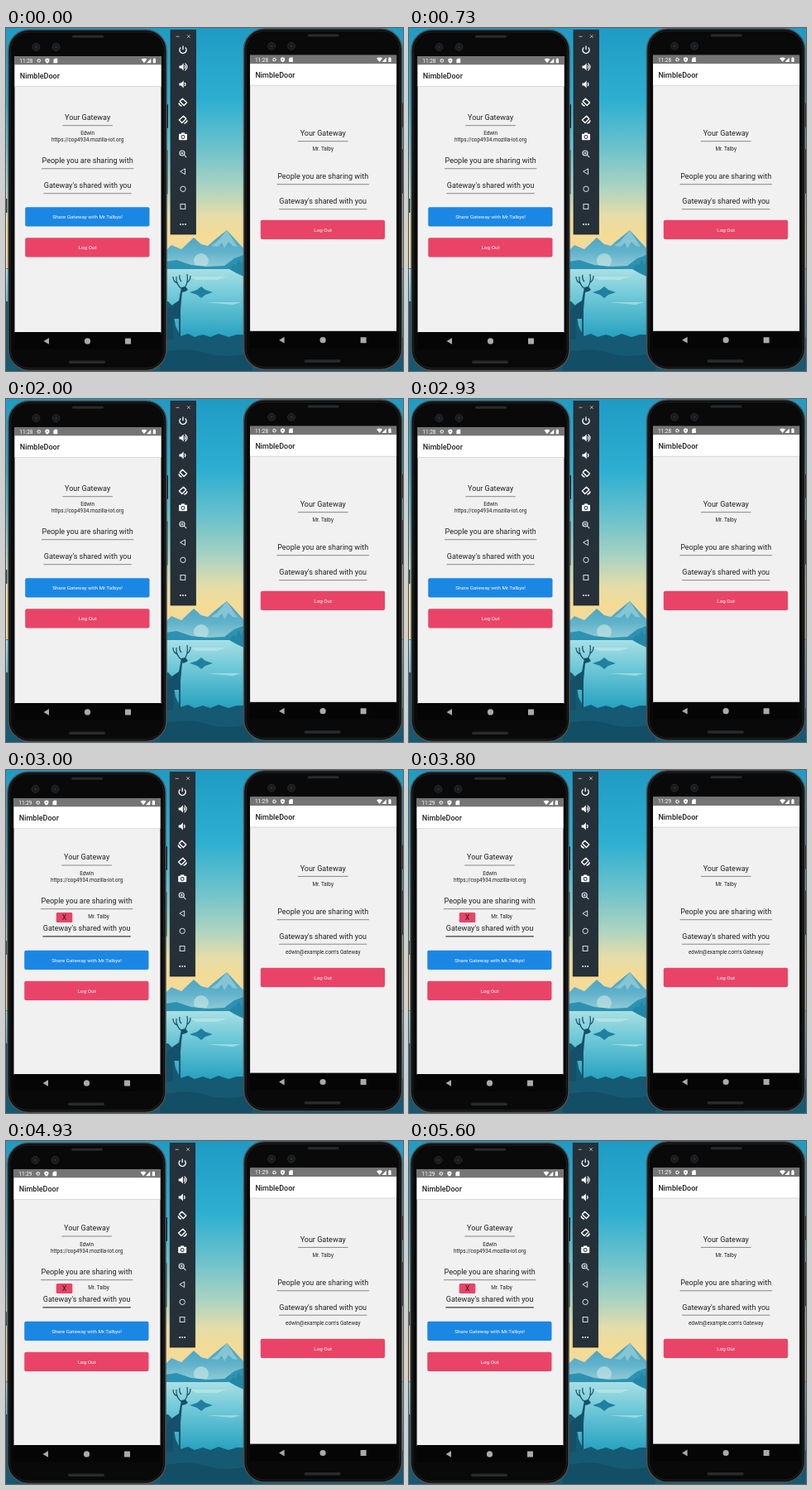
Recreate the animation shown at these times as an HTML page. Size 480 by 414 pixels, loop 5990 ms.

```html
<!DOCTYPE html>
<html lang="en">
<head>
<meta charset="utf-8">
<title>Gateway sharing</title>
<style>
html, body { margin: 0; width: 100%; height: 100%; overflow: hidden; background: #1b95b8; }
svg { display: block; width: 480px; height: 414px; font-family: Roboto, Arial, sans-serif; }
</style>
</head>
<body>
<svg id="stage" viewBox="0 0 480 414">
  <defs>
    <linearGradient id="sky" x2="0" y2="1">
      <stop offset="0" stop-color="#1f9bc4"/>
      <stop offset=".3" stop-color="#2dafd1"/>
      <stop offset=".5" stop-color="#6cc2cc"/>
      <stop offset=".66" stop-color="#a9d3c2"/>
      <stop offset=".78" stop-color="#e5dda8"/>
      <stop offset=".86" stop-color="#f4db95"/>
      <stop offset="1" stop-color="#f1d9a5"/>
    </linearGradient>
    <linearGradient id="peaks" x2="0" y2="1">
      <stop offset="0" stop-color="#429fc0"/>
      <stop offset=".5" stop-color="#62b3cb"/>
      <stop offset="1" stop-color="#a5d5da"/>
    </linearGradient>
    <linearGradient id="lake" x2="0" y2="1">
      <stop offset="0" stop-color="#a9dfe4"/>
      <stop offset=".35" stop-color="#74cbd9"/>
      <stop offset="1" stop-color="#24a0bf"/>
    </linearGradient>
  </defs>
  <g id="wallpaper">
    <rect width="480" height="290" fill="url(#sky)"/>
    <path d="M186 276l14-14 12 5 15-14 9 8 8 2 8-7 15-12 11 12 12 13 8 2v26H186z" fill="url(#peaks)"/>
    <path d="M267 244l-12 14-7 5 8 1 5-5 3 7 5-8 5 5 6 1z" fill="#86c5d4"/>
    <circle cx="236" cy="281" r="9" fill="#c4e5e3" opacity=".65"/>
    <path d="M186 283l20-3 18 6 20 2 20-1 12-9 22-8v26H186z" fill="#2d92b2"/>
    <rect y="291" width="480" height="84" fill="url(#lake)"/>
    <path d="M222 300h45l-12 4h-25zM242 331h42l-10 3z" fill="#c3e9eb" opacity=".6"/>
    <path d="M222 319l9-3 5-4 5 4 9 3-9 3-5 4-5-4z" fill="#207f9f"/>
    <path d="M270 291l5-6 3 2 3-8 4 6 3-9 10 11v17q-15-5-28-13z" fill="#2287a6"/>
    <path d="M0 330h196l5 5 4 25 6 12 9-3 8 4 10-3 9 3 10-4 12 4 10-3 201 3v41H0z" fill="#155a72"/>
    <path d="M186 392q38-8 62 2 24 5 50-3v23H186z" fill="#124e65"/>
    <g fill="#15506a">
      <path d="M212 313l5-1 3 4-3 2-4 1-1 10-1 11v33h-2v-22h-7v25h-8v-30l2-7 7-6 6-4z"/>
      <path d="M213 315q-8-5-7-15m2 8q-6-1-6-8m12 15q7-5 5-18m0 10q4-2 4-8m-11 7q-3-3-2-8" fill="none" stroke="#15506a" stroke-width="1.2"/>
    </g>
  </g>
</svg>
<script>
const LOOP = 5990, SWITCH = 3000;
const PINK = '#e94467', BLUE = '#1b87e5', INK = '#202124', MID = 98.6;

const rect = (x, y, w, h, fill, rx = 0, more = '') =>
  `<rect x="${x}" y="${y}" width="${w}" height="${h}" fill="${fill}" rx="${rx}" ${more}/>`;
const dot = (x, y, r, fill, more = '') => `<circle cx="${x}" cy="${y}" r="${r}" fill="${fill}" ${more}/>`;
const text = (s, x, y, size, fill = INK, more = 'text-anchor="middle"') =>
  `<text x="${x}" y="${y}" font-size="${size}" fill="${fill}" ${more}>${s}</text>`;
const line = (d, color, w = 1) =>
  `<path d="${d}" fill="none" stroke="${color}" stroke-width="${w}" stroke-linejoin="round"/>`;
const shape = (d, fill) => `<path d="${d}" fill="${fill}"/>`;
const move = (x, y, body) => `<g transform="translate(${x} ${y})">${body}</g>`;

// Heading with its rule below; y is the baseline
const heading = (s, y, half, color = '#888', w = 1) =>
  text(s, MID, y, 9) + rect(MID - half, y + 6.2, half * 2, w, color);
const small = (s, y, x = MID) => text(s, x, y, 6.35);
const button = (s, y, fill) =>
  rect(23.2, y, 150.3, 23.3, fill, 2) + text(s, MID, y + 13.9, 6.25, '#fff');

const yours = y => heading('Your Gateway', y, 30.3);
const people = y => heading('People you are sharing with', y, 55.7);
const shared = (y, color, w) => heading("Gateway's shared with you", y, 53.2, color, w);

function phone(x, y, clock, content) {
  const status =
    rect(10.5, 34, 177, 10.5, '#757575') +
    text(clock, 16.3, 41.8, 6.5, '#fff', '') +
    dot(39.8, 39.4, 1.7, 'none', 'stroke="#fff" stroke-width="1.4" stroke-dasharray="1 .4"') +
    shape('M49.9 36.5l2.5 1v2q0 2-2.5 3.2-2.5-1.2-2.5-3.2v-2z', '#fff') + dot(49.9, 39.3, .8, '#757575') +
    shape('M59 36.7h3.2v5.6h-4.8v-4z', '#fff') +
    shape('M163.5 37.8q3.5-2.3 7 0l-3.5 4.5zM175.3 36.8v5.5H170zM177.8 37.2h.9v-.7h1.4v.7h.9v5.1h-3.2z', '#fff');
  const nav =
    rect(10.5, 367, 177, 20.5, '#050505') +
    shape('M45.5 377.9l6.5-3.9v7.8z', '#aaa') +
    dot(98.5, 377.9, 3.6, '#aaa') + rect(144, 374.4, 7, 7, '#aaa', .5);
  return move(x, y,
    rect(192.6, 92, 3.4, 29, '#1c1c1e', 1) + rect(192.6, 147, 2.8, 54, '#26282a', 1) +
    rect(3, 2.2, 191, 411, '#090909', 25, 'stroke="#4a4e51" stroke-width="1.6"') +
    rect(5.6, 4.8, 185.8, 405.8, 'none', 22, 'stroke="#222425"') +
    rect(80, 8.7, 38, 3, '#292a2c', 1.5) + rect(76, 401.5, 44, 3.4, '#292a2c', 1.7) +
    [36.5, 60.5].map(cx => dot(cx, 23, 4.4, '#17191b', 'stroke="#292c2f"') + dot(cx, 23, 1.8, '#252b31')).join('') +
    rect(10.5, 34, 177, 334, '#f1f1f1') + status +
    rect(10.5, 44.5, 177, 25.5, '#fff') + rect(10.5, 70, 177, 1, '#d9d9d9') +
    text('NimbleDoor', 16.8, 61, 9, INK, 'font-weight="500"') + nav) +
    move(x, 0, content);
}

function speaker(y, waves) {
  return shape(`M209.5 ${y - 1.6}h2.2l3-3v9.2l-3-3h-2.2z`, '#fff') +
    line(`M216 ${y - 2}q2 2 0 4` + (waves > 1 ? `m.5-6.4q5 4.4 0 8.8` : ''), '#fff', 1.2);
}

function rotate(y, flip) {
  return `<g transform="translate(214 ${y}) scale(${flip} 1)">` +
    line('M-3.8-.6l3.2-3.2 5.2 4.8-3.4 3.4zM-5 1.4q.4 3.2 3.6 3.8', '#fff', 1.4) + '</g>';
}

function toolbar(x) {
  return move(x, 0,
    rect(199, 2.5, 30.5, 246.5, '#263039', 0, 'stroke="#1a2228" stroke-width=".7"') +
    line('M205.5 10.3h4M219 8.3l3.6 3.6m0-3.6l-3.6 3.6', '#cbd2d6', .8) +
    line('M211.3 23.4a4.1 4.1 0 1 0 5.4 0M214 21.5v4.7', '#fff', 1.3) +
    speaker(47, 2) + speaker(68, 1) + rotate(89, 1) + rotate(110, -1) +
    rect(209, 127.7, 10, 7.6, '#fff', 1) + rect(212, 126.4, 4, 2, '#fff') +
    dot(214, 131.5, 2.4, '#263039') + dot(214, 131.5, 1.4, '#fff') +
    dot(213, 151, 3, 'none', 'stroke="#dfe4e7" stroke-width="1.2"') +
    line('M215.2 153.2l3 3M211.5 151h3M213 149.5v3', '#dfe4e7', 1.1) +
    line('M216.5 169.8v6.8l-5.8-3.4z', '#dfe4e7') +
    dot(214, 194.3, 3.2, 'none', 'stroke="#dfe4e7"') +
    rect(211, 212.6, 5.8, 5.8, 'none', 0, 'stroke="#dfe4e7"') +
    [211, 214, 217].map(cx => dot(cx, 237, .9, '#fff')).join(''));
}

const RIGHT = 284.6;

const before =
  rect(0, 206, 1.3, 17, '#173c4a') + line('M0 232l1.4 1v3M0 239l1.6 1v3', '#e3dfb5', .8) +
  phone(0, 0, '11:28',
    yours(111) + small('Edwin', 129.2) + small('https://cop4934.mozilla-iot.org', 136.7) +
    people(163) + shared(193) +
    button('Share Gateway with Mr.Talbys!', 216.3, BLUE) + button('Log Out', 253.2, PINK)) +
  toolbar(0) +
  phone(RIGHT, -1.2, '11:28',
    yours(130) + small('Mr. Talby', 148.2) + people(182) + shared(212) +
    button('Log Out', 231.7, PINK));

const after =
  rect(0, 206, .8, 17, '#173c4a') + line('M0 234l1.2 1v5', '#c5d5c1', .7) +
  phone(-1, 0, '11:29',
    yours(108.3) + small('Edwin', 126.9) + small('https://cop4934.mozilla-iot.org', 134.5) +
    people(161) + rect(61.7, 172, 19.6, 12, PINK, 1.5) + text('X', 71.5, 181.4, 8.8) +
    small('Mr. Talby', 179.2, 113) + shared(194, '#444', 1.3) +
    button('Share Gateway with Mr.Talbys!', 217.8, BLUE) + button('Log Out', 254.8, PINK)) +
  toolbar(-.8) +
  phone(RIGHT, -1.4, '11:29',
    yours(121.7) + small('Mr. Talby', 140) + people(174) + shared(203.5) +
    small("edwin@example.com's Gateway", 221.6) + button('Log Out', 238.8, PINK));

const stage = document.getElementById('stage');
stage.insertAdjacentHTML('beforeend', `<g>${before}</g><g>${after}</g>`);
const scenes = [...stage.children].slice(-2);
const start = performance.now();

function draw() {
  const current = (performance.now() - start) % LOOP < SWITCH ? 0 : 1;
  scenes.forEach((g, i) => g.style.display = i === current ? '' : 'none');
  requestAnimationFrame(draw);
}
draw();
</script>
</body>
</html>
```
